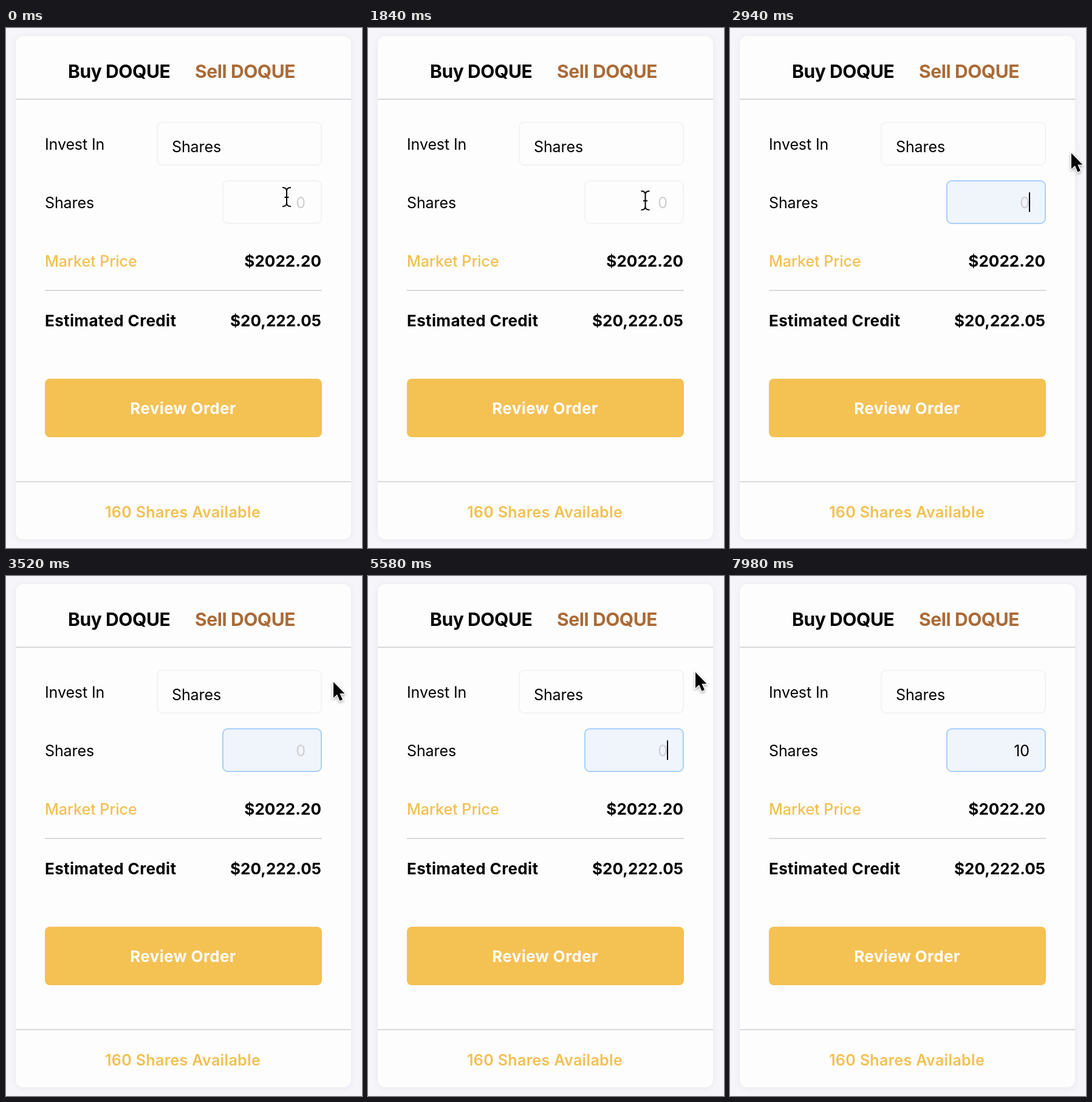
An HTML page that plays this animation: 586x854 px, repeating every 8 s.

```html
<!DOCTYPE html>
<html lang="en">
<head>
<meta charset="utf-8">
<title>Sell order form</title>
<style>
  html, body { margin: 0; width: 100%; height: 100%; overflow: hidden; background: #f6f6fa; }
  svg { display: block; width: 586px; height: 854px; }
  text { font: 400 25px Inter, sans-serif; letter-spacing: -.1px; fill: #000; }
  .bold { font-weight: 700; font-size: 26px; letter-spacing: .35px; }
  .price { letter-spacing: .05px; }
  .tab { font-weight: 700; font-size: 30px; letter-spacing: -.4px; }
  .gold { font-weight: 500; letter-spacing: 0; fill: #f2c04f; }
  .avail { font-weight: 600; letter-spacing: .35px; }
  .end { text-anchor: end; }
  .mid { text-anchor: middle; }
  .box { fill: #fdfdfd; stroke: #f3f3f7; stroke-width: 2; }
  .rule { stroke: #d8d8dd; stroke-width: 2; }
  #card { fill: #fdfdfd; filter: drop-shadow(0 1px 5px #e4e4ec); }
  #arrow { filter: drop-shadow(0 2px 2px #aaa); }
</style>
</head>
<body>
<svg viewBox="0 0 586 854">
  <rect id="card" x="16" y="13" width="552" height="827" rx="13"/>
  <path class="rule" d="M16 117H568M64 431H520M16 745H568"/>

  <text class="tab" x="102" y="82">Buy DOQUE</text>
  <text class="tab" x="311" y="82" style="fill:#ab6a36">Sell DOQUE</text>

  <text x="64" y="200">Invest In</text>
  <rect class="box" x="249" y="155" width="270" height="70" rx="8"/>
  <text x="273" y="204">Shares</text>

  <text x="64" y="296">Shares</text>
  <rect class="box" id="field" x="357" y="251" width="162" height="70" rx="8"/>
  <text class="end" id="amount" x="493" y="296">0</text>
  <rect id="caret" x="492" y="270" width="2" height="32"/>

  <text class="gold" x="64" y="392">Market Price</text>
  <text class="bold price end" x="519" y="392">$2022.20</text>
  <text class="bold" x="64" y="490">Estimated Credit</text>
  <text class="bold price end" x="519" y="490">$20,222.05</text>

  <rect x="64" y="576" width="456" height="96" rx="8" fill="#f4c153"/>
  <text class="bold mid" x="291.5" y="634" style="fill:#fdfdfd">Review Order</text>
  <text class="gold avail mid" x="291" y="804">160 Shares Available</text>

  <path id="beam" fill="none" stroke="#000" stroke-width="2"
    d="M-7-15.5Q0-15.5 0-10Q0-15.5 7-15.5M0-10V10M-7 15.5Q0 15.5 0 10Q0 15.5 7 15.5M-3.5 .5H3.5"/>
  <path id="arrow" stroke="#fff" stroke-width="2.5" paint-order="stroke"
    d="M0 0V26L6 20.5L10.5 31L15 29L10.5 19H18.5Z"/>
</svg>
<script>
  const LOOP = 8000, FOCUS = 2400, LEAVE = 2720, TYPE_ONE = 5740, TYPE_ZERO = 6590;
  const BLINK = 1400;
  // Pointer stops: time, x, y
  const stops = [
    [0, 462, 277.5], [400, 454, 285], [1700, 454, 285], [2300, 472, 272], [2560, 472, 272],
    [2900, 562, 206], [3340, 556, 186], [3500, 539, 174], [4300, 539, 174], [4700, 539, 158],
    [LOOP, 539, 158]
  ];
  const el = id => document.getElementById(id);
  const [field, amount, caret, beam, arrow] = ['field', 'amount', 'caret', 'beam', 'arrow'].map(el);
  const show = (node, on) => node.setAttribute('visibility', on ? 'visible' : 'hidden');

  function pointerAt(t) {
    const i = stops.findIndex(s => s[0] > t);
    const [t0, x0, y0] = stops[i - 1], [t1, x1, y1] = stops[i];
    const p = (t - t0) / (t1 - t0), e = p * p * (3 - 2 * p);
    return [x0 + (x1 - x0) * e, y0 + (y1 - y0) * e];
  }

  function draw(t) {
    const focused = t >= FOCUS, typed = t >= TYPE_ONE;
    const lastInput = t >= TYPE_ZERO ? TYPE_ZERO : typed ? TYPE_ONE : FOCUS;
    const [x, y] = pointerAt(t), inside = x < 520;

    field.style.stroke = focused ? '#a8d0fa' : '';
    field.style.fill = t >= LEAVE ? '#f0f4fb' : '';
    amount.textContent = t >= TYPE_ZERO ? '10' : typed ? '1' : '0';
    amount.style.fill = typed ? '#000' : '#cfcfd2';
    show(caret, focused && (t - lastInput) % BLINK < BLINK / 2);

    for (const node of [beam, arrow]) node.setAttribute('transform', `translate(${x} ${y})`);
    show(beam, inside);
    show(arrow, !inside && !typed);
  }

  const start = performance.now();
  function tick() {
    draw((performance.now() - start) % LOOP);
    requestAnimationFrame(tick);
  }
  tick();
</script>
</body>
</html>
```
